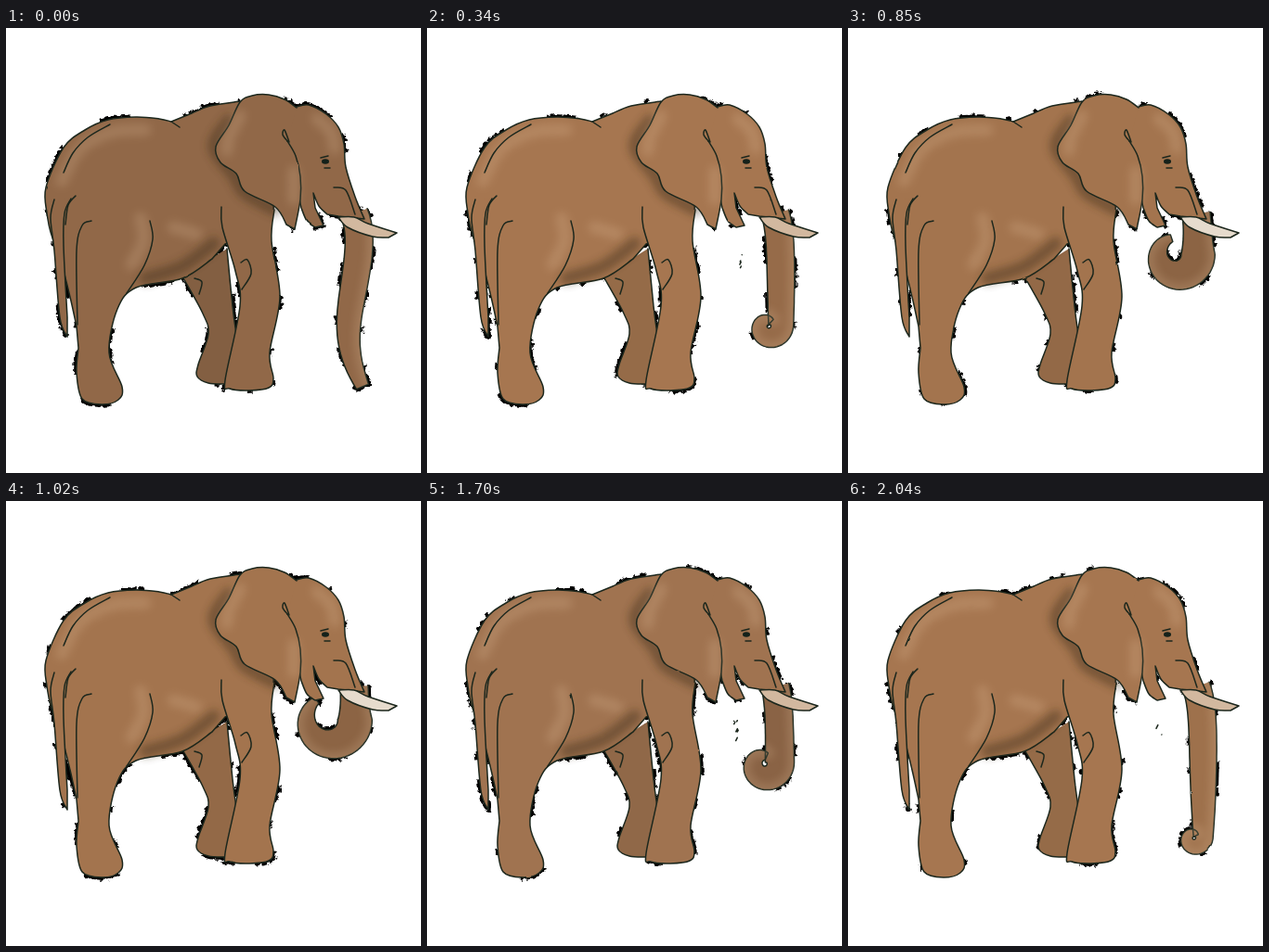
An HTML page for the animation above (2.21 s loop, 447 px wide and 480 px high).

```html
<!DOCTYPE html>
<html lang="en">
<head>
<meta charset="utf-8">
<title>Elephant curling its trunk</title>
<style>
  html, body { margin: 0; width: 100%; height: 100%; overflow: hidden; background: #fff; }
  svg { display: block; width: 447px; height: 480px; }
  path { fill: none; stroke-linecap: round; stroke-linejoin: round; }
  .skin, .far, .trunk, .tusk, .line { stroke: #1c271d; stroke-width: 1.5; }
  .skin { fill: var(--skin); }
  .far { fill: color-mix(in srgb, var(--skin) 86%, #30251a); }
  .trunk { fill: color-mix(in srgb, var(--skin) var(--lit), #30251a); }
  .tusk { fill: var(--tusk); }
  .fringe { stroke: #000; stroke-width: 5.5; stroke-linecap: butt; }
  .dark, .light { stroke-width: 13; filter: url(#soft); }
  .dark { stroke: #3b2a18; opacity: .45; }
  .light { stroke: #ffe0bc; opacity: .16; }
  .pose { opacity: 0; animation: 2210ms step-end infinite; }
</style>
</head>
<body>
<svg id="stage" viewBox="0 0 447 480"></svg>
<script>
const STEPS = 13, POSES = 7, stage = document.getElementById('stage');

// Smooth curve through points; "|" marks a corner.
function curve(text) {
  return text.split('|').map((part, i) => {
    const p = part.trim().split(/\s+/).map(s => s.split(',').map(Number));
    let d = (i ? 'L' : 'M') + p[0];
    for (let j = 0; j < p.length - 1; j++) {
      const a = p[j - 1] || p[j], b = p[j], c = p[j + 1], e = p[j + 2] || c;
      d += `C${b.map((v, n) => v + (c[n] - a[n]) / 6)} ${c.map((v, n) => v - (e[n] - b[n]) / 6)} ${c}`;
    }
    return d;
  }).join('');
}
const path = (cls, d, more = '') => `<path class="${cls}" d="${d}" ${more}/>`;
const draw = (cls, points) => path(cls, curve(points));

function seeded(seed) {
  return () => {
    seed = (seed * 16807) % 2147483647;
    return seed / 2147483647;
  };
}

const torso = '44,200 43,172 62,129 85,110 110,99 140,96 165,98 178,101 | 200,92 220,84 252,79 | 290,150 288,198 | ' +
  '260,225 236,233 | 222,249 190,270 140,280 120,303 111,350 125,387 121,401 103,406 82,400 76,372 78,345 | ' +
  '76,322 69,290 60,255 48,220 44,200';
const nearLeg = '232,193 233,215 247,262 252,300 236,380 241,389 262,391 283,388 288,378 284,350 295,290 286,230 289,196';
const farLeg = '190,268 212,308 218,330 207,363 206,376 218,383 236,384 | 248,330 244,300 238,238';
const head = '313,85 326,83 345,93 358,107 364,125 366,150 376,182 386,206 | 358,203 | 346,201 337,192 331,178 | ' +
  '333,194 342,213 | 333,215 324,208 318,194 | 300,110';
const earBack = '311,217 | 302,212 290,193 257,176 248,157 231,145 226,128 240,105 252,80 265,73 283,72 300,77 313,86';
const ear = '303,122 312,138 317,160 317,185 ' + earBack;
const tail = '52,185 48,205 52,240 58,312 66,333 | 66,312 62,235 63,200 70,184';

const front =
  draw('skin', torso) + draw('skin', tail) +
  draw('light', '60,165 80,130 115,112 150,110') + draw('light', '145,205 148,230 135,255') +
  draw('light', '180,215 205,222') + draw('dark', '150,270 190,257 224,232') +
  draw('skin', nearLeg) + draw('dark', '240,100 224,128 246,160 257,178 290,196') +
  draw('skin', head) + draw('light', '335,98 350,112 354,130') +
  draw('skin', ear).replace('/>', 'style="stroke:none"/>') + draw('line', ear) +
  draw('light', '252,95 240,118 238,132') + draw('light', '310,155 310,185') +
  [
    '178,101 187,107', '62,156 72,135 88,118 112,104', '92,208 82,213 76,240 77,320',
    '155,208 158,228 149,256 130,286', '75,181 67,191 64,212', '253,253 260,250 264,265 254,282',
    '203,270 211,274 208,287', '303,122 298,115 300,110 305,123', '353,172 366,175 376,201',
    '339,140 347,138', '343,151 349,151'
  ].map(p => draw('line', p)).join('') +
  '<ellipse cx="344" cy="144" rx="4" ry="2.8" fill="#14211a"/>' +
  draw('tusk', '358,204 375,204 390,211 421,221 | 412,226 395,225 368,215 358,204');

// The trunk hangs for a while, then winds into a spiral that opens as it rises.
const drop = [187, 162, 120, 82, 60, 44, 36];
function trunk(k) {
  const t = k / 6, length = drop[k], hang = 30, arc = k ? 44 : 0, bend = 7 + 11.5 * (1 - (1 - t) ** 2);
  const turn = (2 - .7 * t) * Math.PI, mid = [], inner = [], outer = [];
  for (let i = 0; i <= hang; i++) {
    const v = i / hang, s = v * length;
    const sway = k ? 0 : 15 * Math.sin(Math.PI * v ** 1.8);
    mid.push({ x: 375 + (9 - 8 * t) * (1 - Math.exp(-s / 20)) - sway, y: 200 + s, w: 15 + (bend - 15) * v ** 3, r: 99 });
  }
  for (let i = 1; i <= arc; i++) {
    const u = i / arc, last = mid[mid.length - 1], a = (i - .5) / arc * turn;
    const r = (7 + 19 * t) * (1 - u * (1 - t)), step = r * turn / arc;
    mid.push({ x: last.x - Math.sin(a) * step, y: last.y + Math.cos(a) * step, w: bend + (4 - bend) * u ** 1.7, r });
  }
  mid.forEach(({ x, y, w, r }, i) => {
    const a = mid[Math.max(i - 1, 0)], b = mid[Math.min(i + 1, mid.length - 1)];
    const angle = Math.atan2(b.y - a.y, b.x - a.x);
    const side = d => [x - Math.sin(angle) * d, y + Math.cos(angle) * d].map(n => n.toFixed(1));
    inner.push(side(Math.min(w, r * .85)));
    outer.push(side(-w));
  });
  return { shape: 'M' + [...outer, ...inner.reverse()].join('L'), edge: 'M' + outer.join('L') };
}

// Ragged black scraps peek out from under the skin, new ones in every pose.
function fringe(k, trunkShape) {
  const rnd = seeded(k * 977 + 41);
  const dashes = () => Array.from({ length: 12 }, (_, i) => ((i % 2 ? 22 : 5) + rnd() ** 2 * 40).toFixed(0));
  return [torso, nearLeg, farLeg, head, earBack, tail].map(curve).concat(trunkShape)
    .map(d => path('fringe', d, `stroke-dasharray="${dashes()}"`)).join('');
}

function specks(k) {
  const rnd = seeded(k + 5), count = k && k < 5 ? k * 2 : 0;
  let d = '';
  for (let i = 0; i < count; i++) {
    const h = rnd() * 5;
    d += `M${330 + rnd() * 10} ${236 + rnd() * 30}l${h / 2} ${-h}`;
  }
  return path('line', d);
}

const rough = (id, seed, freq, scale) => `<filter id="${id}" x="0" y="0" width="447" height="480"
  filterUnits="userSpaceOnUse" color-interpolation-filters="sRGB">
  <feTurbulence type="fractalNoise" baseFrequency="${freq}" numOctaves="2" seed="${seed}"/>
  <feDisplacementMap in="SourceGraphic" scale="${scale}" xChannelSelector="R" yChannelSelector="G"/></filter>`;

const skins = ['#916848', '#a67650', '#a07350', '#a3744e'];
let defs = `<filter id="soft" x="0" y="0" width="447" height="480" filterUnits="userSpaceOnUse">
  <feGaussianBlur stdDeviation="5"/></filter>`;
let css = '', poses = '';
for (let k = 0; k < POSES; k++) {
  const { shape, edge } = trunk(k), lit = 100 - 20 * Math.min(1, k / 3);
  defs += rough('ragged' + k, k + 3, .2, 7) + rough('boil' + k, k + 3, .05, 1.5) +
    `<clipPath id="trunk${k}"><path d="${shape}"/></clipPath>`;
  poses += `<g class="pose" style="animation-name:pose${k};--skin:${skins[(k + 1) >> 1]};--lit:${lit}%;
    --tusk:${k > 4 ? '#e6dbcd' : '#d2b89f'}">
    <g filter="url(#ragged${k})">${fringe(k, shape)}</g>${specks(k)}
    <g filter="url(#boil${k})">${draw('far', farLeg)}${path('trunk', shape)}
      <g clip-path="url(#trunk${k})">${path('light', edge)}</g>${front}</g></g>`;
  // Each pose shows once on the way up and once on the way back.
  css += `@keyframes pose${k}{`;
  for (let i = 0; i < STEPS; i++)
    css += `${(i * 100 / STEPS).toFixed(4)}%{opacity:${+(i === k || i === STEPS - k)}}`;
  css += '}';
}
stage.innerHTML = `<defs>${defs}</defs>${poses}`;
document.head.insertAdjacentHTML('beforeend', `<style>${css}</style>`);
</script>
</body>
</html>
```
